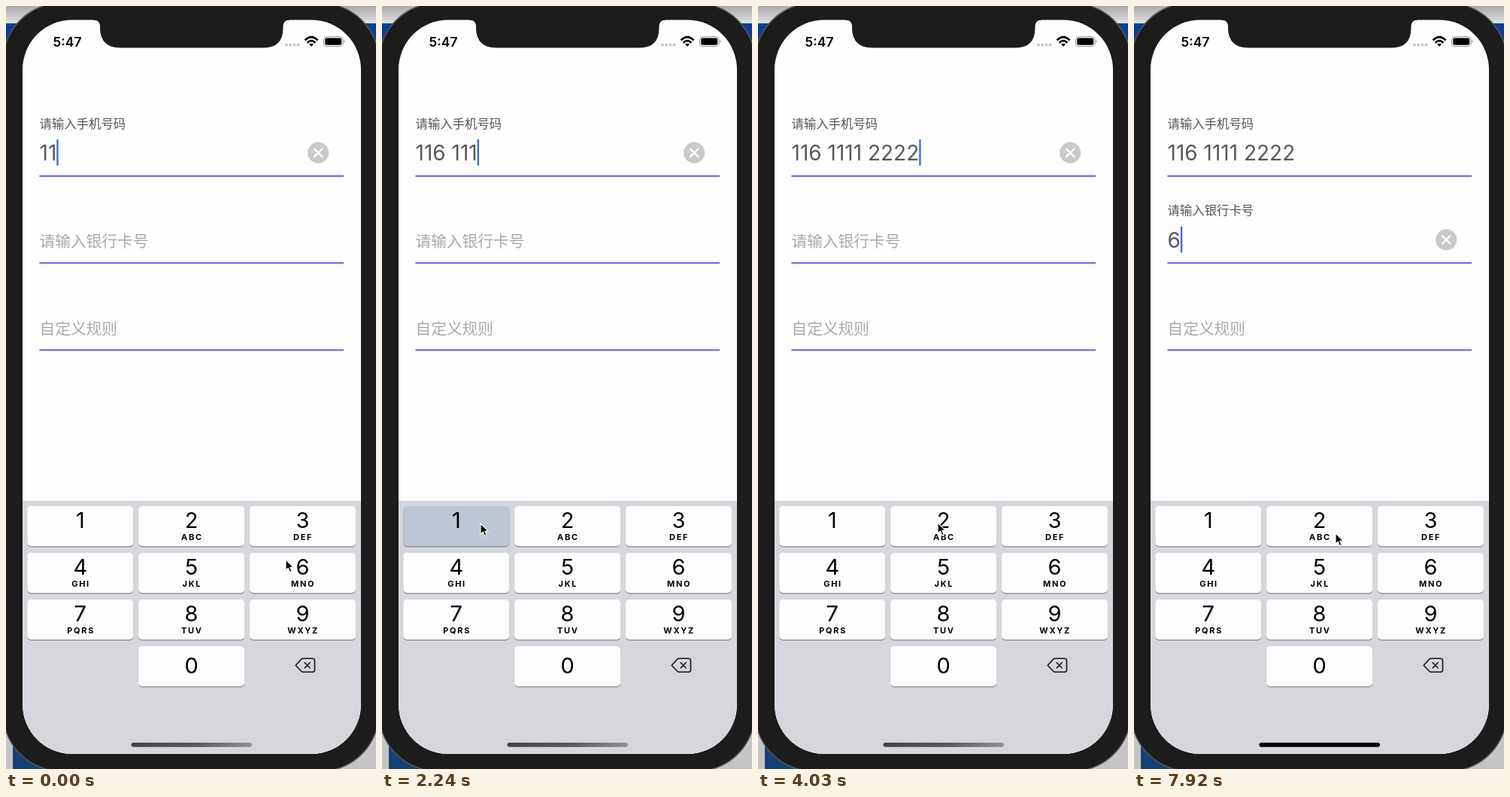
An HTML page for the animation above (8000 ms loop, 492 px wide and 1013 px high).

```html
<!DOCTYPE html>
<html lang="zh-CN">
<head>
<meta charset="utf-8">
<title>Formatted input</title>
<style>
  html, body { margin: 0; width: 100%; height: 100%; overflow: hidden; background: #1b1c1b; }
  svg { display: block; width: 492px; height: 1013px; font-family: Inter, "Liberation Sans", sans-serif; }
  .zh { font-family: "Noto Sans CJK SC", "Noto Sans CJK", sans-serif; }
  .label { font-size: 16.4px; fill: #555; }
  .hint { font-size: 20.7px; fill: #a9a9a9; }
  .input { font-size: 28px; fill: #595959; white-space: pre; }
  .digit { font-size: 29px; text-anchor: middle; }
  .letters { font-size: 11px; font-weight: 700; letter-spacing: 1.7px; text-anchor: middle; }
  .caret { fill: #3f6be0; }
</style>
</head>
<body>
<svg viewBox="0 0 492 1013">
  <defs>
    <linearGradient id="top" x2="0" y2="1">
      <stop stop-color="#a9a9a9"/><stop offset="1" stop-color="#e2e2e2"/>
    </linearGradient>
    <linearGradient id="bar">
      <stop stop-color="#444346"/><stop offset=".55" stop-color="#59585b"/><stop offset="1" stop-color="#929196"/>
    </linearGradient>
    <clipPath id="screen"><rect x="22" y="18.5" width="450" height="974.5" rx="66"/></clipPath>
    <g id="clear">
      <circle r="14" fill="#c9c9c9"/>
      <path d="M-5-5 5 5M5-5-5 5" stroke="#fff" stroke-width="2.4" stroke-linecap="round"/>
    </g>
  </defs>

  <rect width="492" height="23" fill="url(#top)"/>
  <rect y="23" width="492" height="900" fill="#0c3f93"/>
  <rect y="900" width="492" height="113" fill="#c4c4c6"/>
  <rect x="9" y="900" width="300" height="113" fill="#173f76"/>
  <rect x="-4" y="-4" width="500" height="1020" rx="78" fill="#1b1c1b" stroke="#555" stroke-width="1.5"/>

  <g clip-path="url(#screen)">
    <rect x="22" y="18" width="450" height="976" fill="#fefefe"/>
    <rect x="22" y="657" width="450" height="337" fill="#d6d7dd"/>
  </g>
  <path d="M116 17V18.5Q125 18.5 125 27.500V30Q126 55.500 152 55.500H342Q368 55.500 368.500 30V27.500Q368.500 18.500 377 18.500V17Z" fill="#1b1c1b"/>

  <text x="62.5" y="53.5" font-size="17.5" font-weight="600">5:47</text>
  <g fill="#c6c6c8">
    <circle cx="373" cy="51.500" r="2"/><circle cx="378.200" cy="51.500" r="2"/>
    <circle cx="383.400" cy="51.500" r="2"/><circle cx="388.600" cy="51.500" r="2"/>
  </g>
  <g fill="none" stroke="#000" stroke-width="2.700">
    <path d="M397.500 45.500Q406 37 414.500 45.500M400.600 48.800Q406 43.500 411.400 48.800"/>
    <path d="M403 50.800Q406 48.600 409 50.800L406 53.800Z" fill="#000" stroke="none"/>
  </g>
  <rect x="422.500" y="40.800" width="25.500" height="12.700" rx="3.500" fill="none" stroke="#9a9a9a"/>
  <rect x="424.200" y="42.500" width="22" height="9.300" rx="2" fill="#000"/>
  <path d="M449.300 45Q451.500 47 449.300 49.300Z" fill="#8a8a8a"/>

  <g fill="#3a2fd8">
    <rect x="44.500" y="225" width="404.500" height="1.500"/>
    <rect x="44.500" y="340.500" width="404.500" height="1.400"/>
    <rect x="44.500" y="456" width="404.500" height="1.400"/>
  </g>
  <text class="zh label" x="44.5" y="161.500">请输入手机号码</text>
  <text class="zh" id="float" x="44.5">请输入银行卡号</text>
  <text class="zh hint" x="44.5" y="435.500">自定义规则</text>
  <text class="input" id="phone" x="44.5" y="205"></text>
  <text class="input" id="card" x="44.5" y="320.500"></text>
  <rect class="caret" id="caret" width="2.400" height="35" rx="1"/>
  <use href="#clear" id="wipe"/>

  <g id="keys"></g>
  <g fill="none" stroke="#111" stroke-width="1.600" stroke-linejoin="round" stroke-linecap="round">
    <path d="M385.200 875.300 392.500 867.500Q393.800 866.300 395.500 866.300H407.500Q410.500 866.300 410.500 869.300V881.300Q410.500 884.300 407.500 884.300H395.500Q393.800 884.300 392.500 883Z"/>
    <path d="M397.200 871.800 404.200 878.800M404.200 871.800 397.200 878.800"/>
  </g>
  <rect id="home" x="166.500" y="978" width="160.500" height="5.700" rx="2.850"/>
  <path id="mouse" d="M0 0V14.200L3.300 11.200 5.600 16.700 8.100 15.600 5.800 10.300H10.300Z" stroke="#fff" stroke-width="1.200" stroke-linejoin="round"/>
</svg>
<script>
const LOOP = 8000, FOCUS = 5380;
const $ = id => document.getElementById(id);

// Redraw bursts: first time, last time, number of steps
const bursts = [
  [0, 0, 1], [150, 600, 4], [900, 1190, 3], [1490, 1790, 3], [2240, 3140, 7], [3290, 3440, 2],
  [3880, 4030, 2], [4480, 5380, 7], [5530, 6430, 7], [6580, 7620, 8], [7770, 7920, 2]
];
const ticks = bursts.flatMap(([from, to, n]) =>
  Array.from({ length: n }, (_, i) => from + (n > 1 ? (to - from) * i / (n - 1) : 0)));

const phone = [
  [0, '11'], [450, '116'], [1045, '116 1'], [1490, '116 11'], [1790, '116 111'], [2390, '116 1111'],
  [2840, '116 1111 2'], [2990, '116 1111 22'], [3140, '116 1111 222'], [3440, '116 1111 2222']
];
const card = [[0, ''], [7770, '6']];

// Key, pressed, released
const presses = [
  [6, 150, 450], [1, 900, 1045], [1, 1190, 1490], [1, 1640, 1790], [1, 2240, 2390],
  [2, 2690, 2840], [2, 2990, 3140], [2, 3290, 3440], [2, 3880, 4030], [6, 7600, 7770]
];

// Time, x, y
const path = [
  [0, 372, 735], [300, 372, 735], [600, 131, 710], [750, 131, 710], [900, 131, 687], [2390, 131, 687],
  [2690, 239, 686], [4330, 239, 686], [5080, 180, 307], [5530, 180, 307], [6280, 173, 727],
  [6580, 173, 727], [7470, 388, 742], [7770, 388, 742], [7920, 268, 700]
];

const clamp = v => Math.min(1, Math.max(0, v));
const ease = v => v * v * (3 - 2 * v);
const mix = (a, b, p) => a + (b - a) * p;
const latest = (table, t) => table.filter(row => row[0] <= t).pop();

function pointer(t) {
  const i = path.findIndex(p => p[0] > t);
  if (i < 0) return path[path.length - 1].slice(1);
  const a = path[i - 1], b = path[i], p = ease((t - a[0]) / (b[0] - a[0]));
  return [mix(a[1], b[1], p), mix(a[2], b[2], p)];
}

function caretAlpha(t) {
  const start = t < FOCUS ? 4030 : FOCUS;
  if (t < start || t >= 7770) return 1;
  const phase = (t - start) % 1000;
  return phase < 500 ? 1 : phase < 700 ? 1 - (phase - 500) / 200 : clamp((phase - 800) / 200);
}

function buildKeys() {
  const letters = ['', 'ABC', 'DEF', 'GHI', 'JKL', 'MNO', 'PQRS', 'TUV', 'WXYZ'];
  const key = (n, col, row, sub) => {
    const x = 28.3 + col * 147.8, y = 664 + row * 62, cx = x + 70.5;
    return `<rect x="${x}" y="${y + 1.2}" width="141" height="53.300" rx="5" fill="#898a8e"/>
      <rect id="key${n}" x="${x}" y="${y}" width="141" height="53.300" rx="5"/>
      <text class="digit" x="${cx}" y="${n ? y + 28.7 : y + 36}">${n}</text>
      <text class="letters" x="${cx + .8}" y="${y + 45.2}">${sub}</text>`;
  };
  $('keys').innerHTML = letters.map((s, i) => key(i + 1, i % 3, Math.floor(i / 3), s)).join('') + key(0, 1, 3, '');
}

function set(el, attrs) {
  for (const name in attrs) el.setAttribute(name, attrs[name]);
}

function draw(t) {
  const onCard = t >= FOCUS;
  $('phone').textContent = latest(phone, t)[1];
  $('card').textContent = latest(card, t)[1];

  const field = $(onCard ? 'card' : 'phone');
  const width = field.textContent ? field.getComputedTextLength() : 0;
  set($('caret'), { x: 44.5 + width, y: onCard ? 292.5 : 177, opacity: caretAlpha(t) });
  set($('wipe'), {
    transform: `translate(415.200 ${onCard ? 310.3 : 194.8})`,
    visibility: field.textContent ? 'visible' : 'hidden'
  });

  const p = ease(clamp((t - FOCUS + 30) / 300)), grey = Math.round(mix(169, 85, p));
  set($('float'), { y: mix(320, 277, p), 'font-size': mix(20.7, 16.4, p), fill: `rgb(${grey},${grey},${grey})` });

  for (let n = 0; n < 10; n++) {
    const down = presses.some(([k, from, to]) => k === n && t >= from && t < to);
    $('key' + n).setAttribute('fill', down ? '#bdc6d3' : '#fefefe');
  }
  $('home').setAttribute('fill', onCard ? '#000' : 'url(#bar)');
  $('mouse').setAttribute('transform', `translate(${pointer(t)})`);
}

buildKeys();
const began = performance.now();
let shown = -1;
function frame() {
  const now = (performance.now() - began) % LOOP;
  const tick = ticks.filter(v => v <= now).pop();
  if (tick !== shown) draw(shown = tick);
  requestAnimationFrame(frame);
}
frame();
</script>
</body>
</html>
```
